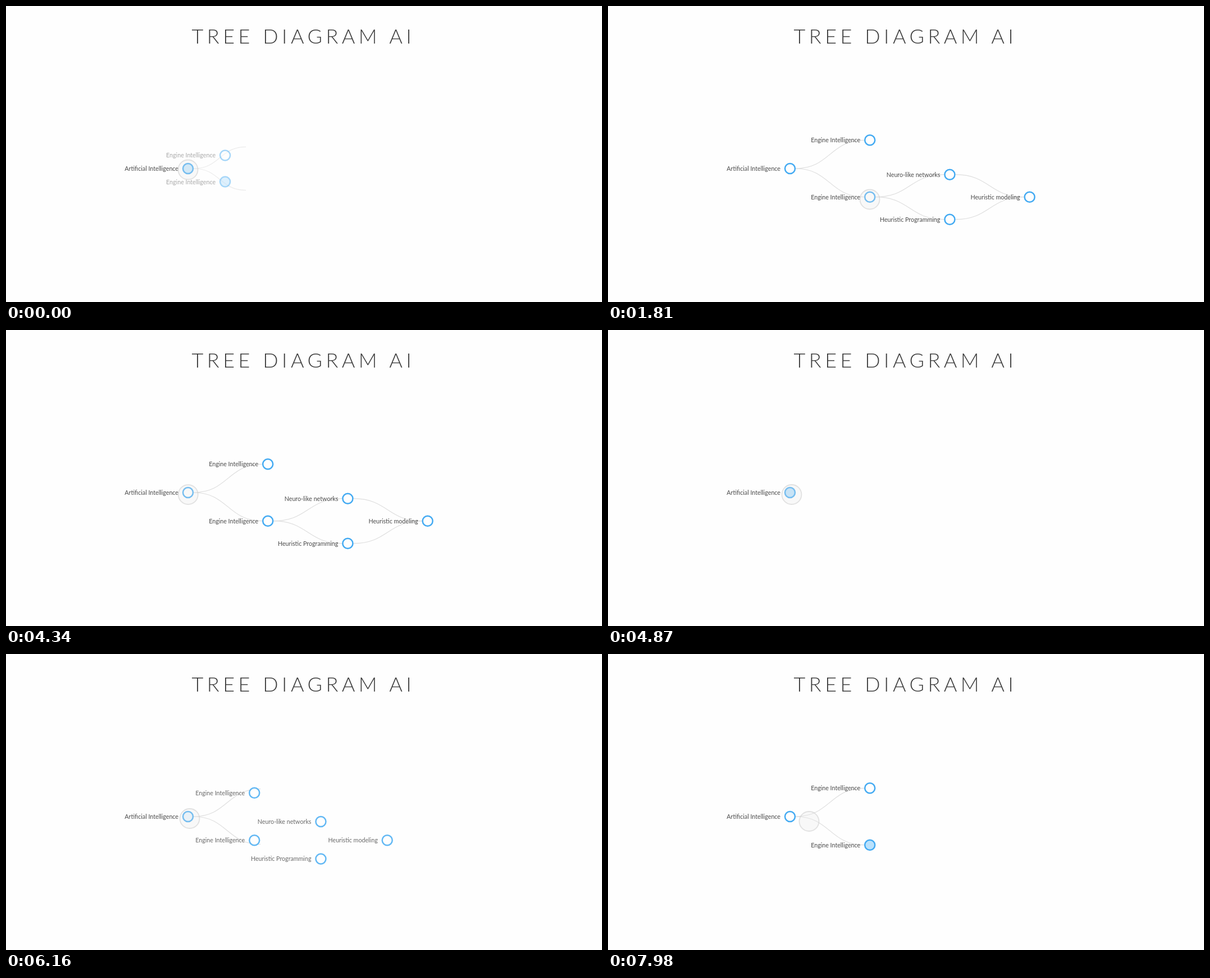
An HTML page for the animation above (8000 ms loop, 1061 by 528 pixels).

```html
<!DOCTYPE html>
<html lang="en">
<head>
<meta charset="utf-8">
<title>Tree diagram</title>
<style>
  html, body { margin: 0; width: 100%; height: 100%; overflow: hidden; background: #fefefe; }
  svg { display: block; width: 1061px; height: 528px; font-family: Lato, "Open Sans", sans-serif; }
  .title { font-size: 36px; font-weight: 300; letter-spacing: 6.5px; text-anchor: middle; fill: #3c3c3c; }
  .node text { font-size: 10.7px; text-anchor: end; fill: #4a4a4a; }
  .node circle { stroke: #43aaf2; stroke-width: 2.5px; }
  .link { fill: none; stroke: #dedede; stroke-width: 1.2px; }
  .cursor { fill: rgba(232, 232, 232, .3); stroke: rgba(208, 208, 208, .6); stroke-width: 1.8px; }
</style>
</head>
<body>
<svg viewBox="0 0 1061 528">
  <text class="title" x="529.3" y="67">TREE DIAGRAM AI</text>
  <g id="links"></g>
  <g id="nodes"></g>
  <circle class="cursor" r="17.5"/>
</svg>
<script>
const LOOP = 8000, NODE_TIME = 500, LINK_TIME = 400, DEEP_DELAY = 300;
const LEFT = 324, MIDDLE = 290, COLUMN = 142.2, SPREAD = 50.7, INNER_SPREAD = 40;

const makeNode = (depth, y, label) => ({ depth, x: LEFT + depth * COLUMN, y, label });
const lower = MIDDLE + SPREAD;
const root = makeNode(0, MIDDLE, 'Artificial Intelligence');
const leaf = makeNode(1, MIDDLE - SPREAD, 'Engine Intelligence');
const branch = makeNode(1, lower, 'Engine Intelligence');
const networks = makeNode(2, lower - INNER_SPREAD, 'Neuro-like networks');
const programming = makeNode(2, lower + INNER_SPREAD, 'Heuristic Programming');
const modeling = makeNode(3, lower, 'Heuristic modeling');

const nodes = [modeling, programming, networks, branch, leaf, root];
const links = [
  [root, leaf], [root, branch], [branch, networks],
  [branch, programming], [networks, modeling], [programming, modeling]
].map(([from, to]) => ({ from, to }));

// Click times: open, close, open, ...
const rootClicks = [-243, 4375, 5835];
const branchClicks = [1110, 6950];

const pointerStart = { x: 324, y: 292 };
const pointerMoves = [
  { begin: 200, end: 560, x: 490, y: 342 },
  { begin: 780, end: 1070, x: 466, y: 345 },
  { begin: 3575, end: 3950, x: 269, y: 295 },
  { begin: 3950, end: 4400, x: 327, y: 293.5 },
  { begin: 6250, end: 6870, x: 463, y: 336 },
  { begin: 7680, end: 7980, x: 358, y: 298.5 }
];

const lerp = (a, b, p) => a + (b - a) * p;
const clamp = p => Math.min(1, Math.max(0, p));
const ease = p => p < .5 ? 4 * p ** 3 : 1 - 4 * (1 - p) ** 3;
const smooth = p => p * p * (3 - 2 * p);

function add(parent, tag, attrs = {}) {
  const el = document.createElementNS('http://www.w3.org/2000/svg', tag);
  set(el, attrs);
  return parent.appendChild(el);
}

function set(el, attrs) {
  for (const name in attrs) el.setAttribute(name, attrs[name]);
}

function openness(clicks, t, duration, delay = 0) {
  const i = clicks.findLastIndex(c => c <= t);
  if (i < 0) return 0;
  const opening = i % 2 === 0;
  const p = ease(clamp((t - clicks[i] - (opening ? delay : 0)) / duration));
  return opening ? p : 1 - p;
}

function pointerAt(t) {
  let { x, y } = pointerStart;
  for (const move of pointerMoves) {
    const p = smooth(clamp((t - move.begin) / (move.end - move.begin)));
    x = lerp(x, move.x, p);
    y = lerp(y, move.y, p);
  }
  return { cx: x, cy: y };
}

function linkGrowth({ from }, t) {
  const grow = (clicks, source) =>
    openness(clicks, t, LINK_TIME, from === source ? 0 : DEEP_DELAY);
  const byRoot = grow(rootClicks, root);
  return from === root ? byRoot : Math.min(byRoot, grow(branchClicks, branch));
}

function curve({ from, to }, p) {
  const x0 = from.x + 10, x1 = lerp(x0, to.x - 10, p);
  const y0 = from.y, y1 = lerp(y0, to.y, p), mid = (x0 + x1) / 2;
  return `M${x0} ${y0}C${mid} ${y0} ${mid} ${y1} ${x1} ${y1}`;
}

const linkLayer = document.getElementById('links');
const nodeLayer = document.getElementById('nodes');
const cursor = document.querySelector('.cursor');

for (const link of links) link.el = add(linkLayer, 'path', { class: 'link' });
for (const node of nodes) {
  node.el = add(nodeLayer, 'g', { class: 'node' });
  node.dot = add(node.el, 'circle', { r: 9, fill: '#fefefe' });
  add(node.el, 'text', { x: -17, y: 4 }).textContent = node.label;
}

function draw(t) {
  const rootOpen = openness(rootClicks, t, NODE_TIME);
  const branchOpen = openness(branchClicks, t, NODE_TIME);

  for (const link of links) {
    const growth = linkGrowth(link, t);
    set(link.el, { d: curve(link, growth), opacity: growth ** 2 });
  }

  for (const { x, y, depth, el } of nodes) {
    const outer = depth > 0 ? rootOpen : 1;
    const inner = depth > 1 ? branchOpen : 1;
    const px = lerp(root.x, lerp(branch.x, x, inner), outer);
    const py = lerp(root.y, lerp(branch.y, y, inner), outer);
    set(el, { transform: `translate(${px} ${py})`, opacity: outer * inner });
  }

  for (const [node, open] of [[root, rootOpen], [branch, branchOpen]]) {
    const rgb = [185, 225, 252].map(c => Math.round(lerp(c, 254, open ** 2)));
    node.dot.setAttribute('fill', `rgb(${rgb})`);
  }

  set(cursor, pointerAt(t));
}

const start = performance.now();
function frame() {
  draw((performance.now() - start) % LOOP);
  requestAnimationFrame(frame);
}
frame();
</script>
</body>
</html>
```
